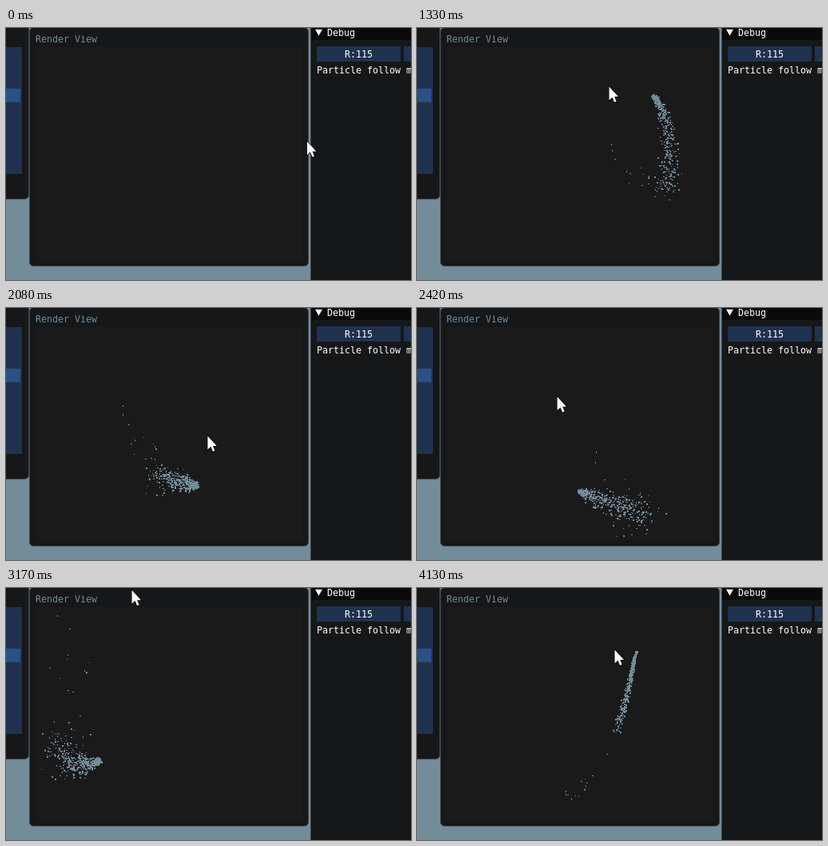
These frames come from a looping animation (507 px wide and 316 px high, 4.15 s). An HTML page:

```html
<!DOCTYPE html>
<html lang="en">
<head>
<meta charset="utf-8">
<title>Particles</title>
<style>
html, body { margin: 0; width: 100%; height: 100%; overflow: hidden; background: #738c99; }
svg { display: block; width: 100%; height: 100%; }
text { font: 11.63px "DejaVu Sans Mono", monospace; fill: #fff; white-space: pre; }
.panel { fill: #151719; stroke: #3f454d; }
.blue { fill: #203250; }
</style>
</head>
<body>
<svg viewBox="0 0 507 316">
  <defs><clipPath id="view"><rect x="37" y="24" width="334" height="267"/></clipPath></defs>
  <rect width="507" height="316" fill="#738c99"/>
  <rect class="panel" x="-20" y="-20" width="48.5" height="234.5" rx="5"/>
  <rect class="blue" y="24" width="20" height="159"/>
  <rect y="76" width="18" height="17" fill="#2a5085"/>
  <rect class="panel" x="29.5" y="-.5" width="349" height="299" rx="5"/>
  <rect x="37" y="24" width="334" height="267" fill="#1a1a1a"/>
  <text x="37" y="18" style="fill:#738c99">Render View</text>
  <rect class="panel" x="381.5" y="-9.5" width="140" height="340"/>
  <rect x="382" width="125" height="15" fill="#0a0a0a"/>
  <path d="M387 1.7h9l-4.5 7.8z" fill="#fff"/>
  <text x="402" y="10">Debug</text>
  <rect class="blue" x="389" y="23" width="105" height="19"/>
  <rect class="blue" x="498" y="23" width="20" height="19"/>
  <text x="424" y="37">R:115</text>
  <text x="389" y="57">Particle follow mouse</text>
  <path id="swarm" clip-path="url(#view)" fill="#738c99" shape-rendering="crispEdges"/>
  <path id="cursor" d="M.5 .5V17.5L4.5 13.8 7 20 9.6 19 7.2 13H12Z" fill="#fff" stroke="#000" stroke-width="1.4" paint-order="stroke"/>
</svg>
<script>
const LOOP = 4150;
const COUNT = 560, STRAGGLERS = 14;
const TAIL = 180; // ms by which the tail trails the head
const swarm = document.getElementById('swarm');
const cursor = document.getElementById('cursor');

// key points: time, x, y
const pointerPath = [
  [0, 377, 142], [450, 120, 40], [720, 180, 114], [980, 250, 25], [1330, 240, 73],
  [2080, 252, 160], [2760, 112, 46], [3630, 235, -16], [4130, 247, 77]
];
const swarmPath = [
  [0, 410, 410], [540, 68, 90], [720, 126, 74], [1150, 306, 200], [1330, 295, 85],
  [1560, 150, 90], [1900, 188, 205], [2080, 238, 223], [2300, 270, 255],
  [2580, 100, 165], [2760, 92, 27], [3080, 80, 220], [3450, 272, 100],
  [3630, 293, -60], [3790, 190, 255], [3950, 247, 180], [4130, 274, 79]
];

// smooth curve through timed points
function along(path, time) {
  const last = path.length - 1;
  const t = Math.max(0, Math.min(time, path[last][0]));
  let i = 0;
  while (i < last - 1 && t > path[i + 1][0]) i++;
  const a = path[i], b = path[i + 1];
  const before = path[Math.max(i - 1, 0)], after = path[Math.min(i + 2, last)];
  const span = b[0] - a[0], k = (t - a[0]) / span;
  return [1, 2].map(n => {
    const m0 = (b[n] - before[n]) / (b[0] - before[0]) * span;
    const m1 = (after[n] - a[n]) / (after[0] - a[0]) * span;
    const d = b[n] - a[n];
    return a[n] + m0 * k + (3 * d - 2 * m0 - m1) * k * k + (m0 + m1 - 2 * d) * k ** 3;
  });
}

let seed = 7;
function random() {
  seed = (seed * 16807) % 2147483647;
  return seed / 2147483647;
}
const scatter = () => (random() + random() + random() - 1.5) * 1.5;

const particles = Array.from({ length: COUNT }, (_, i) => {
  const lag = i < STRAGGLERS ? 1 + .9 * random() : random() ** 2.4;
  const reach = .1 + lag ** .7;
  return {
    lag: lag * TAIL,
    dx: scatter() * reach,
    dy: scatter() * reach,
    w: random() < .6 ? 2 : 1,
    h: random() < .4 ? 2 : 1
  };
});

function draw(t) {
  const [x, y] = along(pointerPath, t);
  cursor.setAttribute('transform', `translate(${x} ${y})`);

  // the swarm spreads out with its distance from the pointer
  const [headX, headY] = along(swarmPath, t);
  const spread = Math.min(Math.hypot(headX - x, headY - y), 80) ** 1.5 / 45;
  swarm.setAttribute('d', particles.map(({ lag, dx, dy, w, h }) => {
    const [px, py] = along(swarmPath, t - lag);
    return `M${Math.round(px + dx * spread)} ${Math.round(py + dy * spread)}h${w}v${h}h${-w}z`;
  }).join(''));
}

const start = performance.now();
function frame() {
  draw((performance.now() - start) % LOOP);
  requestAnimationFrame(frame);
}
draw(0);
requestAnimationFrame(frame);
</script>
</body>
</html>
```
